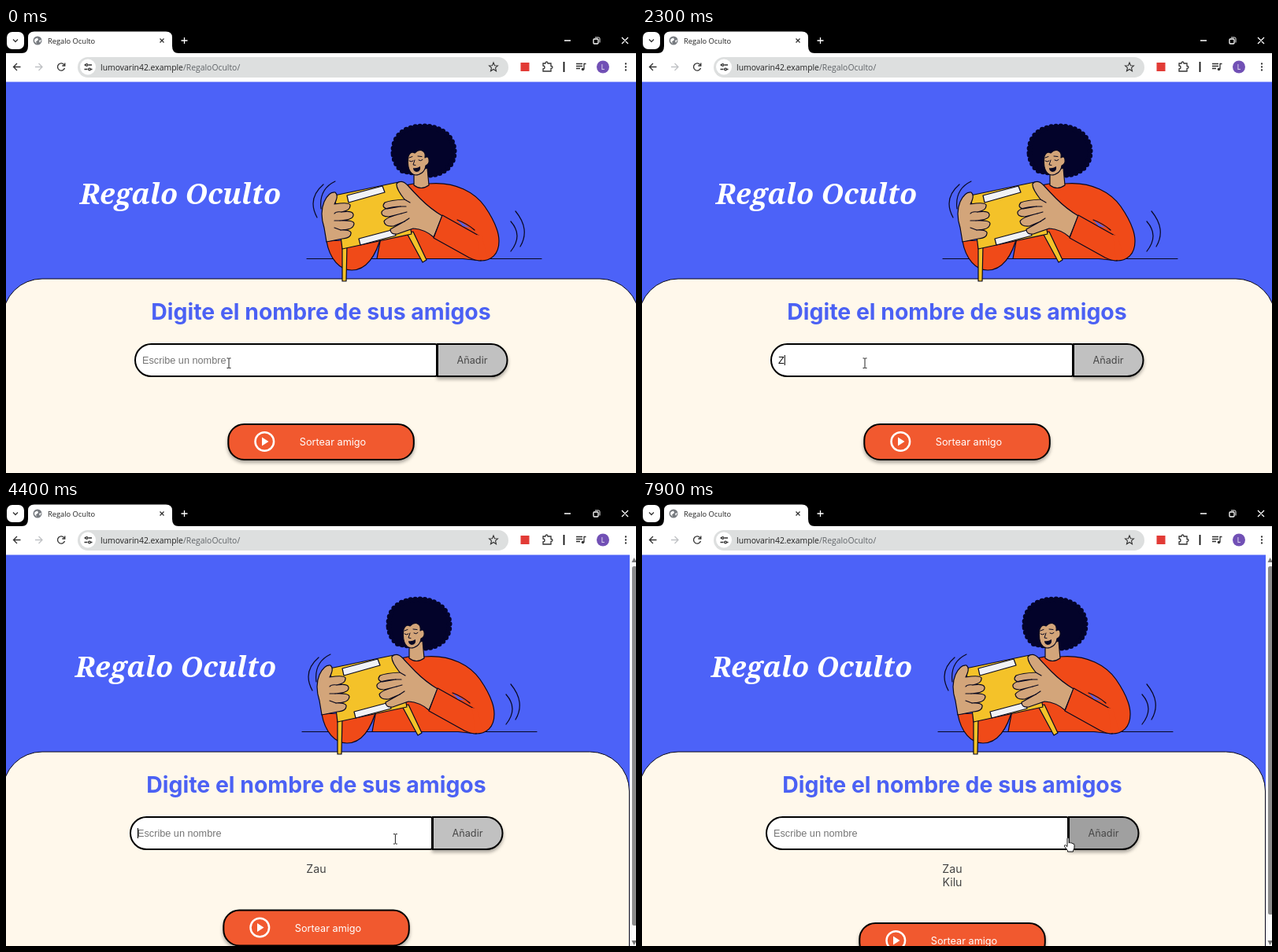
Write an HTML page that moves like this. It is 800 by 566 pixels and loops after 8000 ms.

```html
<!DOCTYPE html>
<html lang="es">
<head>
<meta charset="utf-8">
<style>
html, body { margin: 0; width: 100%; height: 100%; overflow: hidden; background: #fff8eb; }
svg { display: block; width: 100vw; height: 100vh; }
text { white-space: pre; }
.ui { font-family: "Open Sans", "Noto Sans", sans-serif; }
.inter { font-family: Inter, sans-serif; }
.field { font: 12.7px "Liberation Sans", Arial, sans-serif; }
.mid { text-anchor: middle; }
.line { fill: none; stroke: #333; stroke-width: 1.3; }
.ink { stroke: #08081f; stroke-width: 1.2; stroke-linejoin: round; stroke-linecap: round; }
.open { fill: none; }
.skin { fill: #d3a57a; }
.cloth { fill: #f04a18; }
.box { fill: #f4c229; }
.label { fill: #f1f2f6; }
.edge { stroke: #000; stroke-width: 2; }
.soft { filter: drop-shadow(0 3px 2px #0005); }
</style>
</head>
<body>
<svg viewBox="0 0 800 566" preserveAspectRatio="none">
  <rect y="60" width="800" height="506" fill="#4c62f8"/>
  <rect id="panel" x="-4" y="319" width="808" height="400" rx="50" fill="#fff8eb" stroke="#05051a"/>

  <g id="page">
    <text class="mid" x="221.5" y="223.500" fill="#fff" font-size="36" font-weight="900" font-style="italic" font-family="'Noto Serif', serif">Regalo Oculto</text>

    <g class="ink">
      <path class="open" d="M403 199Q382 217 395 241M418 195Q397 205 400 230M647 233Q666 256 653 278M641 246Q657 264 641 284M382 293.500H680"/>
      <path class="cloth" d="M407 271C411 294 424 308 439 308C457 308 470 291 477 262L427 270Z"/>
      <path class="cloth" d="M471 293.500C476 264 483 225 507 200L518 198Q527 207 537 198C572 195 596 210 608 227C619 243 626 258 626 271C626 288 616 296 603 296L580 293.500Z"/>

      <g fill="#03032a" stroke="#03032a">
        <path d="M492 159C491 137 506 125 530 125C555 125 570 140 569 159C568 178 553 187 536 187L504 182Q493 174 492 159Z"/>
        <path stroke-width="7" stroke-dasharray="0 6" d="M492 159C491 137 506 125 530 125C555 125 570 140 569 159C568 178 553 187 536 187L504 182Q493 174 492 159Z"/>
      </g>
      <path class="skin" d="M518 184L518 200Q527 207 537 200L535 178Z"/>
      <path class="skin" d="M511 163Q514 156 519 159Q525 153 530 157Q533 159 532 165Q536 162 537 167Q538 173 533 175C532 183 526 187 520 187C512 186 509 176 511 163Z"/>
      <path class="open" stroke-width="1" d="M512 169q2.500 2 5 0M524 168q3 2 5-0.500M512 165l4-1.500M523 163l5 .5M519 168l-2 6 3 .5"/>
      <path fill="#090923" stroke="none" d="M517 178Q521 179 526 176Q527 183 521 183Q517 182 517 178Z"/>

      <path class="box" d="M427 276L427 322H432L433 276ZM509 261L529 298L534 295L517 259Z"/>
      <path class="box" d="M417 213L501 195.500L507 218L515 262L427 281Q423 246 417 213Z"/>
      <path class="label" d="M433 213L478 201L481 209L435 222ZM448 268L493 256L495 264L450 276Z"/>

      <path class="skin" d="M407 272L427 268Q439 267 438 260Q436 256 425 257Q441 257 442 249Q442 244 424 245Q442 244 441 237Q440 232 426 234Q438 232 437 225Q435 221 417 224Q423 213 418 209Q410 208 404 221Q398 235 404 254Z"/>
      <path class="open" d="M426 234Q419 233 417 236M424 245L417 245M425 257L417 254"/>

      <path class="skin" d="M554 239L543 266Q532 256 517 255L497 262Q488 263 488 256L506 246L492 252Q481 253 480 246Q482 241 502 236L486 240Q476 240 477 234Q480 228 501 227L484 230Q476 228 481 222Q488 219 506 218Q495 204 496 198Q502 192 510 200Q518 209 526 217Q539 230 554 239Z"/>
      <path class="open" d="M506 246L512 242M502 236L509 234M501 227L508 227M506 218L513 222"/>

      <path class="cloth" d="M543 267L554 238L602 265L603 296Q596 296 588 292Z"/>
      <path fill="#4c62f8" stroke="none" d="M573 244L589 254L580 252Z"/>
      <path class="cloth" stroke="none" d="M598 263L604 264L612 294L602 295Z"/>
      <path class="open" d="M573 244Q586 249 595 257"/>
    </g>

    <text class="mid inter" x="400" y="371" fill="#4b61f4" font-size="28.4" font-weight="700">Digite el nombre de sus amigos</text>
    <path id="add" class="edge soft" d="M548 402H616A20.500 20.500 0 0 1 616 443H548Z"/>
    <path class="edge" fill="#fff" d="M184.500 402H545Q547 402 547 404V441Q547 443 545 443H184.500A20.500 20.500 0 0 1 184.500 402Z"/>
    <text id="typed" class="field" x="173" y="426.500"></text>
    <path id="caret" stroke="#000" d="M0 416V429"/>
    <text class="mid inter" x="592" y="427" font-size="12.7" fill="#484848">Añadir</text>
    <g class="mid inter" font-size="14.2" fill="#444">
      <text id="first" x="400" y="473">Zau</text>
      <text id="second" x="400" y="489.500">Kilu</text>
    </g>
    <g id="draw">
      <rect class="edge soft" x="282.300" y="504" width="235.500" height="45" rx="20" fill="#f1592f"/>
      <circle cx="328.300" cy="526" r="11.800" fill="none" stroke="#fff" stroke-width="2.500"/>
      <path fill="#fff" d="M325 520.500V531.500L333.500 526Z"/>
      <text class="mid inter" x="415" y="531" font-size="12.7" fill="#fff">Sortear amigo</text>
    </g>
  </g>

  <g id="bar">
    <rect x="792" y="68" width="8" height="498" fill="#fcfcfc"/>
    <rect id="thumb" x="795" y="83" width="6" rx="2.500" fill="#8b8b8b"/>
    <path fill="#777" d="M794.500 78L797.500 72L801 78ZM794.500 559L797.500 565L801 559Z"/>
  </g>

  <g id="browser">
    <rect width="800" height="32" fill="#000"/>
    <rect y="32" width="800" height="36.500" fill="#fff"/>
    <rect x="1" y="5" width="22" height="22" rx="7" fill="#fff"/>
    <path class="line" d="M9 14.500l3 3 3-3"/>
    <path fill="#fff" d="M20 32Q28 32 28 23V12Q28 4.500 36 4.500H203Q211 4.500 211 12V23Q211 32 219 32Z"/>
    <circle cx="40" cy="16" r="5.500" fill="#777b80"/>
    <path fill="#fff" d="M36.500 14L40 12.500L41 15L38 17.500L39 20L36 17ZM42 16L45 15L43 19Z"/>
    <text class="ui" x="53" y="19.700" font-size="9.3" fill="#222">Regalo Oculto</text>
    <path class="line" d="M195.500 13.500l5 5m0-5l-5 5"/>
    <g class="line" style="stroke:#fff">
      <path d="M222.500 16h8m-4-4v8M709 16h8M782 12l8 8m0-8l-8 8"/>
      <rect x="746" y="14" width="6" height="6" rx="1"/>
      <path stroke-width="1" d="M748 12h4.500q1.500 0 1.500 1.500v5"/>
    </g>
    <path class="line" d="M18.500 49.500H9.500m4.500-4.500l-4.500 4.500 4.500 4.500"/>
    <path class="line" style="stroke:#c0c2c5" d="M37 49.500h9m-4.500-4.500l4.500 4.500-4.500 4.500"/>
    <path class="line" d="M74 47a4.600 4.600 0 1 0 .5 4M74.800 44.500v3.500h-3.500"/>
    <rect x="91" y="37" width="547" height="26" rx="13" fill="#dddfdf"/>
    <circle cx="104" cy="49.500" r="10" fill="#fff"/>
    <path class="line" d="M99.500 47h2m3 0h4.500M99.500 52.500h4m3.500 0h2.500"/>
    <g class="line"><circle cx="102.500" cy="47" r="1.400"/><circle cx="106" cy="52.500" r="1.400"/></g>
    <text class="ui" x="120" y="53.500" font-size="10.4" fill="#222">lumovarin42.example<tspan fill="#606468">/RegaloOculto/</tspan></text>
    <path class="line" style="stroke-width:1.1" d="M619 44l1.500 3.700 4 .3-3 2.700 1 4-3.500-2.200-3.500 2.200 1-4-3-2.700 4-.3Z"/>
    <rect x="653.500" y="44" width="11" height="11" fill="#e23b36"/>
    <path class="line" d="M682 45h3q0-2 1.500-2t1.500 2h4v3.500q2 0 2 1.500t-2 1.500v3.500h-10v-3q2 0 2-2t-2-2Z"/>
    <path stroke="#111" stroke-width="1.800" d="M708.500 43V56"/>
    <path class="line" d="M724 45.500h8M724 48.500h8M724 51.500h5M736.500 45.500h-2.500v7"/>
    <circle cx="732.500" cy="52.500" r="1.800" fill="#333"/>
    <circle cx="758" cy="49.500" r="8" fill="#7150b5"/>
    <text class="mid ui" x="758" y="52.700" font-size="8.500" fill="#fff">L</text>
    <path d="M787 45.500v0m0 4v0m0 4v0" stroke="#333" stroke-width="2.300" stroke-linecap="round"/>
  </g>

  <path id="beam" fill="none" stroke="#222" d="M-2.500-6h2l.5.5.5-.5h2M0-5.500V6M-2.500 6.500h2l.5-.5.5.5h2"/>
  <path id="hand" fill="#fff" stroke="#111" stroke-linejoin="round" d="M-1 1Q0-.5 1.200 1V7Q2.500 5.700 3.500 7Q5 6.300 6 8Q8 7.500 8 9.500V13Q7.500 15 6.500 16.500V18H-.5V16.500L-4.500 11.500Q-5 9.500-3.500 9.500L-1 11.500Z"/>
</svg>
<script>
const el = id => document.getElementById(id);
const LOOP = 8000, ADD_1 = 3700, ADD_2 = 7600;

// [time, field content]; an empty field shows the placeholder
const keys = [
  [-500, ""], [1200, "E"], [1700, ""],
  [2200, "Z"], [2500, "Za"], [2800, "Zau"], [ADD_1, ""],
  [4400, ""], [5300, "K"], [5600, "Ki"], [5800, "Kil"], [6100, "Kilu"], [ADD_2, ""]
];
// [time, x, y] of the mouse
const moves = [
  [0, 283, 426], [3500, 283, 426], [3700, 582, 435], [4100, 582, 435],
  [4600, 436, 426], [5900, 436, 426], [6300, 442, 426], [7000, 442, 426],
  [7300, 575, 430], [7700, 575, 430], [7900, 541, 428], [LOOP, 541, 428]
];

const show = (id, on) => el(id).style.display = on ? "" : "none";
const shift = (id, x, y) => el(id).setAttribute("transform", `translate(${x} ${y})`);

function mouseAt(t) {
  const i = moves.findIndex(m => m[0] > t);
  const [t0, x0, y0] = moves[i - 1], [t1, x1, y1] = moves[i];
  const p = (t - t0) / (t1 - t0);
  return [x0 + (x1 - x0) * p, y0 + (y1 - y0) * p];
}

function render(now) {
  const t = Math.floor(now % LOOP / 100) * 100;
  const count = (t >= ADD_1) + (t >= ADD_2);
  const [x, y] = mouseAt(t);
  const over = x > 539;

  shift("page", count ? -6 : 0, 0);
  el("panel").setAttribute("width", count ? 795.5 : 808);
  show("bar", count);
  el("thumb").setAttribute("height", count > 1 ? 443 : 457);
  show("first", count > 0);
  show("second", count > 1);
  shift("draw", 0, count * 16.5);

  const [keyTime, value] = keys.filter(k => k[0] <= t).pop();
  const typed = el("typed");
  typed.textContent = value || "Escribe un nombre";
  typed.setAttribute("fill", value ? "#111" : "#757575");
  const focused = t < ADD_1 || t >= 4400 && t < ADD_2;
  show("caret", focused && Math.floor((t - keyTime) / 500) % 2 === 0);
  shift("caret", 173.5 + (value ? typed.getComputedTextLength() : 0), 0);

  el("add").setAttribute("fill", over ? "#a0a0a0" : "#c1c1c1");
  show("hand", over);
  show("beam", !over);
  shift(over ? "hand" : "beam", x, y);
  requestAnimationFrame(render);
}
render(0);
</script>
</body>
</html>
```
